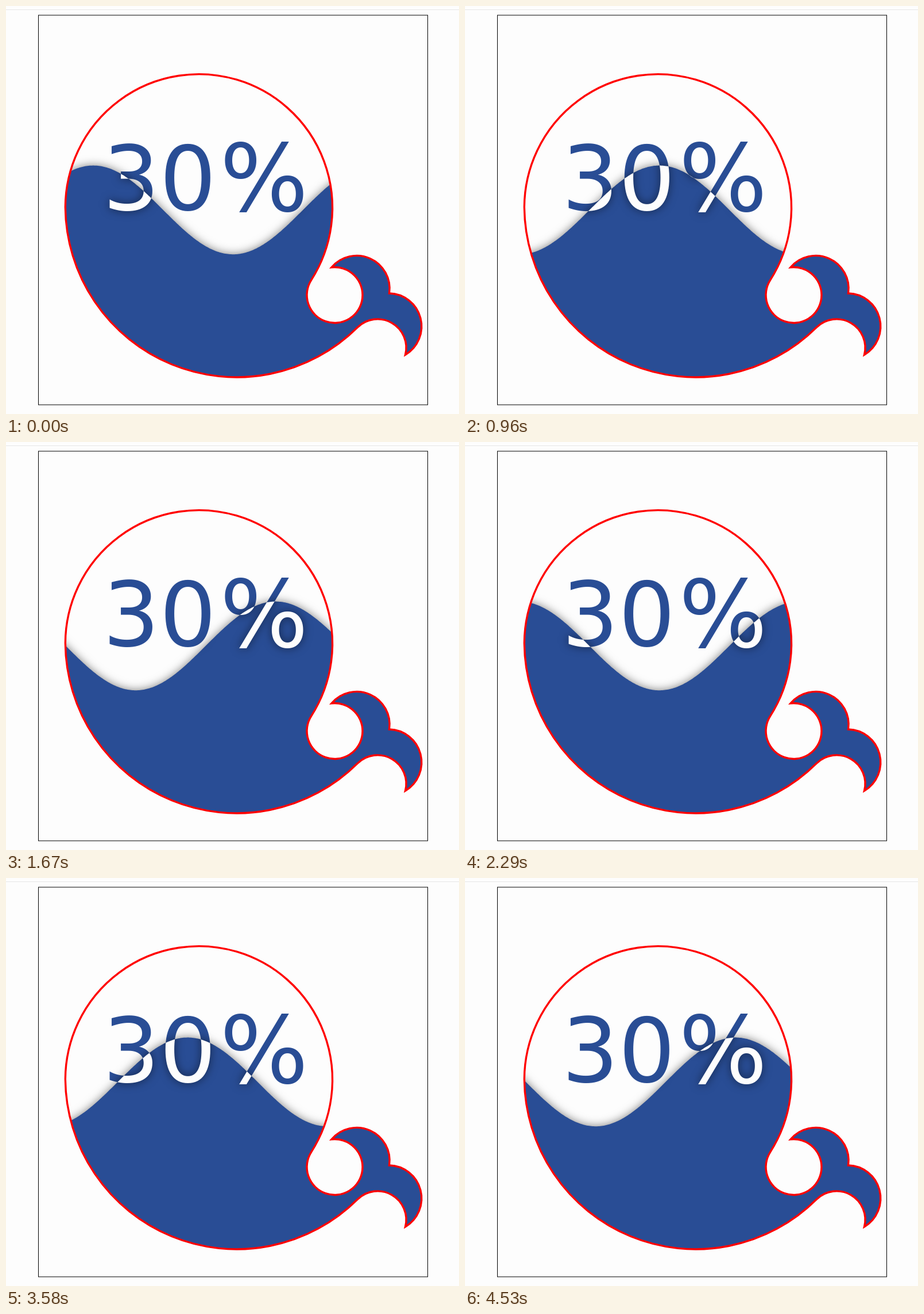
Write an HTML page with a canvas that moves like this. It is 789 by 710 pixels and loops after 4.56 s.

```html
<!DOCTYPE html>
<html lang="en">
<head>
<meta charset="utf-8">
<title>Whale progress</title>
<style>
  html, body { margin: 0; width: 100%; height: 100%; overflow: hidden; background: #fdfdfd; }
  canvas { display: block; }
</style>
</head>
<body>
<canvas id="stage" width="789" height="710"></canvas>
<script>
const ctx = document.getElementById('stage').getContext('2d');
const LOOP = 4560, STEP = 30;
const BLUE = '#294d95', PAPER = '#fdfdfd';
const WAVE = { mid: 354.9, height: 77.3, length: 487 };

// [time in ms, x of the travelling crest]
const CREST = [[0, 152], [960, 338.7], [1670, 469.4], [2290, 582], [2890, 682.5], [3580, 803.3], [4530, 961.5]];

// Head, bay, two tail lobes, tail hollow, belly
const whale = new Path2D(`M103.3 350
  A232.6 232.6 0 1 1 531.7 476.8
  A48.5 48.5 0 1 0 567 454.8
  A57.3 57.3 0 0 1 667.5 500
  A57.5 57.5 0 0 1 695.5 607
  A49.8 49.8 0 0 0 612.2 559.3
  A298.6 298.6 0 0 1 103.3 350Z`);

function crestAt(time) {
  let i = 0;
  while (i < CREST.length - 2 && time >= CREST[i + 1][0]) i++;
  const [t0, x0] = CREST[i], [t1, x1] = CREST[i + 1];
  const held = Math.floor((time - t0) / STEP) * STEP;
  return x0 + (x1 - x0) * Math.min(1, held / (t1 - t0));
}

function makeWave(crest) {
  const path = new Path2D();
  path.moveTo(40, 740);
  for (let x = 40; x <= 760; x += 2) {
    path.lineTo(x, WAVE.mid - WAVE.height * Math.cos((x - crest) / WAVE.length * 2 * Math.PI));
  }
  path.lineTo(760, 740);
  path.closePath();
  return path;
}

function drawText(text, x, y, size) {
  ctx.font = `${size}px "DejaVu Sans", sans-serif`;
  ctx.fillText(text, x, y);
}

function drawLabel(color) {
  ctx.fillStyle = color;
  drawText('30', 168.8, 355, 155);
  drawText('%', 372.5, 357, 162);
}

function draw(time) {
  ctx.fillStyle = PAPER;
  ctx.fillRect(0, 0, 789, 710);
  ctx.fillStyle = '#e6e6e6';
  ctx.fillRect(0, 6, 789, 1);
  ctx.strokeStyle = '#000';
  ctx.lineWidth = 1;
  ctx.strokeRect(56.5, 16, 678, 678);

  const wave = makeWave(crestAt(time));
  ctx.save();
  ctx.clip(whale);
  drawLabel(BLUE);
  ctx.shadowColor = 'rgba(0, 0, 0, 0.5)';
  ctx.shadowBlur = 16;
  ctx.fillStyle = BLUE;
  ctx.fill(wave);
  ctx.clip(wave);
  drawLabel(PAPER);
  ctx.restore();

  ctx.strokeStyle = '#f00';
  ctx.lineWidth = 3.4;
  ctx.stroke(whale);
}

function tick() {
  draw(performance.now() % LOOP);
  requestAnimationFrame(tick);
}
tick();
</script>
</body>
</html>
```
